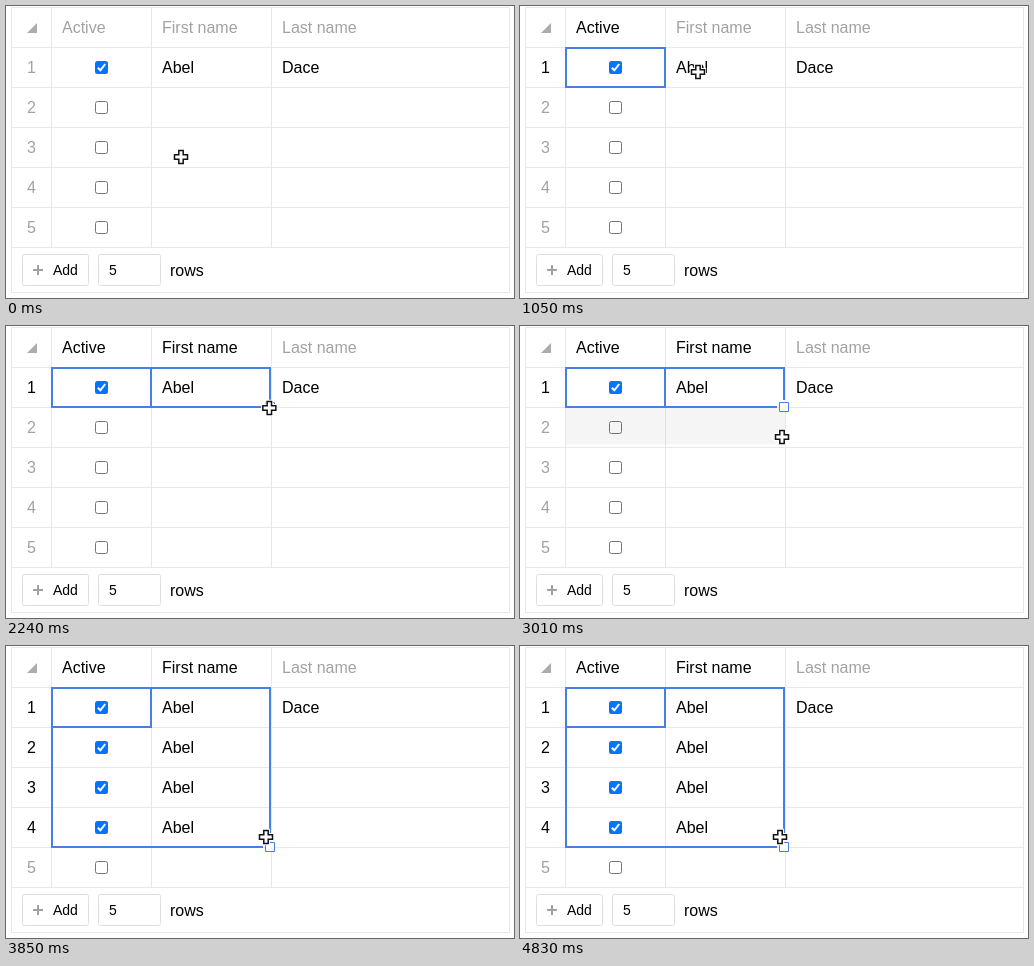
Animation, 508 px wide and 292 px high, one loop 5600 ms. Source, as an HTML page with a canvas:

```html
<!DOCTYPE html>
<html lang="en">
<head>
<meta charset="utf-8">
<title>Data grid fill</title>
<style>
  html, body { margin: 0; height: 100%; overflow: hidden; background: #fff; }
  canvas { display: block; width: 508px; height: 292px; }
</style>
</head>
<body>
<canvas id="stage" width="508" height="292"></canvas>
<script>
const ctx = document.getElementById('stage').getContext('2d');
const LOOP = 5600, STEP = 70;
const GRAY = '#9fa3a6', LINE = '#e6e8ea', BLUE = '#4580e6';
const FIRST = 'Abel', LAST = 'Dace';

// Times of the user's actions
const PRESS = 910, EXTEND = 1050, RELEASE = 1260, FILL = 3710;
const EXPAND = [2940, 3080, 3220];

// Pointer path: time, x, y
const PATH = [
  [0, 175, 151], [70, 173, 148], [350, 138, 98], [560, 114, 65], [630, 112, 63],
  [840, 112, 63], [910, 122, 64], [1050, 178, 66], [1190, 205, 68], [1260, 207, 68],
  [1540, 207, 68], [1610, 208, 69], [1750, 216, 71], [2030, 257, 80], [2170, 263, 82],
  [2380, 264, 82], [2870, 264, 82], [2940, 263, 90], [3010, 262, 111],
  [3360, 260, 187], [3430, 260, 191], [LOOP, 260, 191]
];

// 100 ms ease-out transition
const grow = (t, start) => {
  const p = Math.min(1, Math.max(0, (t - start) / 100));
  return 1 - (1 - p) ** 2;
};

function pointerAt(t) {
  const i = PATH.findIndex(p => p[0] > t);
  const [t0, x0, y0] = PATH[i - 1], [t1, x1, y1] = PATH[i];
  const k = (t - t0) / (t1 - t0);
  return [x0 + (x1 - x0) * k, y0 + (y1 - y0) * k];
}

function rect(x, y, w, h, color) {
  ctx.fillStyle = color;
  ctx.fillRect(x, y, w, h);
}

function text(s, x, y, color = '#000', size = 16, align = 'left') {
  ctx.font = `${size}px "Liberation Sans", Arial, sans-serif`;
  ctx.textAlign = align;
  ctx.fillStyle = color;
  ctx.fillText(s, x, y);
}

function line(points, color, width, close) {
  ctx.beginPath();
  points.forEach(([x, y]) => ctx.lineTo(x, y));
  if (close) ctx.closePath();
  ctx.strokeStyle = color;
  ctx.lineWidth = width;
  ctx.stroke();
}

function box(x, y, w, h, radius, color) {
  ctx.beginPath();
  ctx.roundRect(x + .5, y + .5, w - 1, h - 1, radius);
  ctx.strokeStyle = color;
  ctx.lineWidth = 1;
  ctx.stroke();
}

function gridLines(color) {
  for (let y = 1; y <= 241; y += 40) rect(5, y, 499, 1, color);
  for (const x of [45, 145, 265]) rect(x, 1, 1, 240, color);
}

function checkbox(y, checked) {
  if (!checked) return box(89, y - 6, 13, 13, 2, '#767676');
  ctx.beginPath();
  ctx.roundRect(89, y - 6, 13, 13, 2.5);
  ctx.fillStyle = '#0075ff';
  ctx.fill();
  line([[91.8, y + .8], [94.4, y + 3.3], [99.2, y - 3]], '#fff', 2);
}

function table(t) {
  const headColor = start => t >= start ? '#000' : GRAY;
  gridLines(LINE);
  rect(5, 1, 1, 286, LINE);
  rect(503, 1, 1, 286, LINE);
  rect(5, 286, 499, 1, LINE);

  ctx.beginPath();
  ctx.moveTo(31, 17);
  ctx.lineTo(31, 27);
  ctx.lineTo(21, 27);
  ctx.fillStyle = '#a9adb0';
  ctx.fill();

  text('Active', 56, 27, headColor(PRESS));
  text('First name', 156, 27, headColor(EXTEND + STEP));
  text('Last name', 276, 27, GRAY);
  text(LAST, 276, 67);

  for (let row = 1; row <= 5; row++) {
    const y = 21 + row * 40;
    const filled = row === 1 || (row < 5 && t >= FILL);
    const start = row === 1 ? PRESS : row < 5 ? FILL : LOOP;
    text(row, 25.5, y + 6, headColor(start), 16, 'center');
    checkbox(y, filled);
    if (filled) text(FIRST, 156, y + 6);
  }
}

function footer() {
  box(16, 248, 67, 32, 2, '#dcdfe2');
  rect(27, 263, 10, 2, GRAY);
  rect(31, 259, 2, 10, GRAY);
  text('Add', 47, 269, '#000', 14);
  box(92, 248, 63, 32, 2, '#dcdfe2');
  text('5', 103, 269, '#000', 14);
  text('rows', 164, 270);
}

function selection(t) {
  if (t < PRESS) return;
  const left = 46, top = 42;
  const right = 145 + 119 * grow(t, EXTEND);
  const bottom = 81 + 120 * grow(t, FILL - STEP);

  if (t >= FILL) {
    ctx.save();
    ctx.beginPath();
    ctx.rect(left, top, right - left, bottom - top);
    ctx.clip();
    gridLines('#dfe9f8');
    ctx.restore();
  }
  if (t >= EXPAND[0] && t < FILL) {
    const rows = EXPAND.reduce((sum, start) => sum + grow(t, start), 0);
    rect(46, 82, 219, rows * 40, 'rgba(0,0,0,.04)');
  }

  line([[left, top], [145, top], [145, 81], [left, 81]], BLUE, 2, true);
  const held = t < RELEASE, gap = held ? 0 : 7;
  line([[right, bottom - gap], [right, top], [left, top], [left, bottom],
    [right - gap, bottom]], BLUE, 2, held);
  if (!held) {
    rect(259, bottom - 5, 10, 10, '#fff');
    box(259, bottom - 5, 10, 10, 0, BLUE);
  }
}

function pointer(t) {
  const [x, y] = pointerAt(t), a = 2.2, b = 6.5;
  const plus = [[-a, -b], [a, -b], [a, -a], [b, -a], [b, a], [a, a],
    [a, b], [-a, b], [-a, a], [-b, a], [-b, -a], [-a, -a]]
    .map(([dx, dy]) => [x + dx, y + dy]);
  line(plus, '#fff', 3.4, true);
  ctx.fillStyle = '#fff';
  ctx.fill();
  line(plus, '#111', 1.5, true);
}

function draw() {
  const t = Math.floor(performance.now() % LOOP / STEP) * STEP;
  rect(0, 0, 508, 292, '#fff');
  table(t);
  footer();
  selection(t);
  pointer(t);
  requestAnimationFrame(draw);
}
draw();
</script>
</body>
</html>
```
